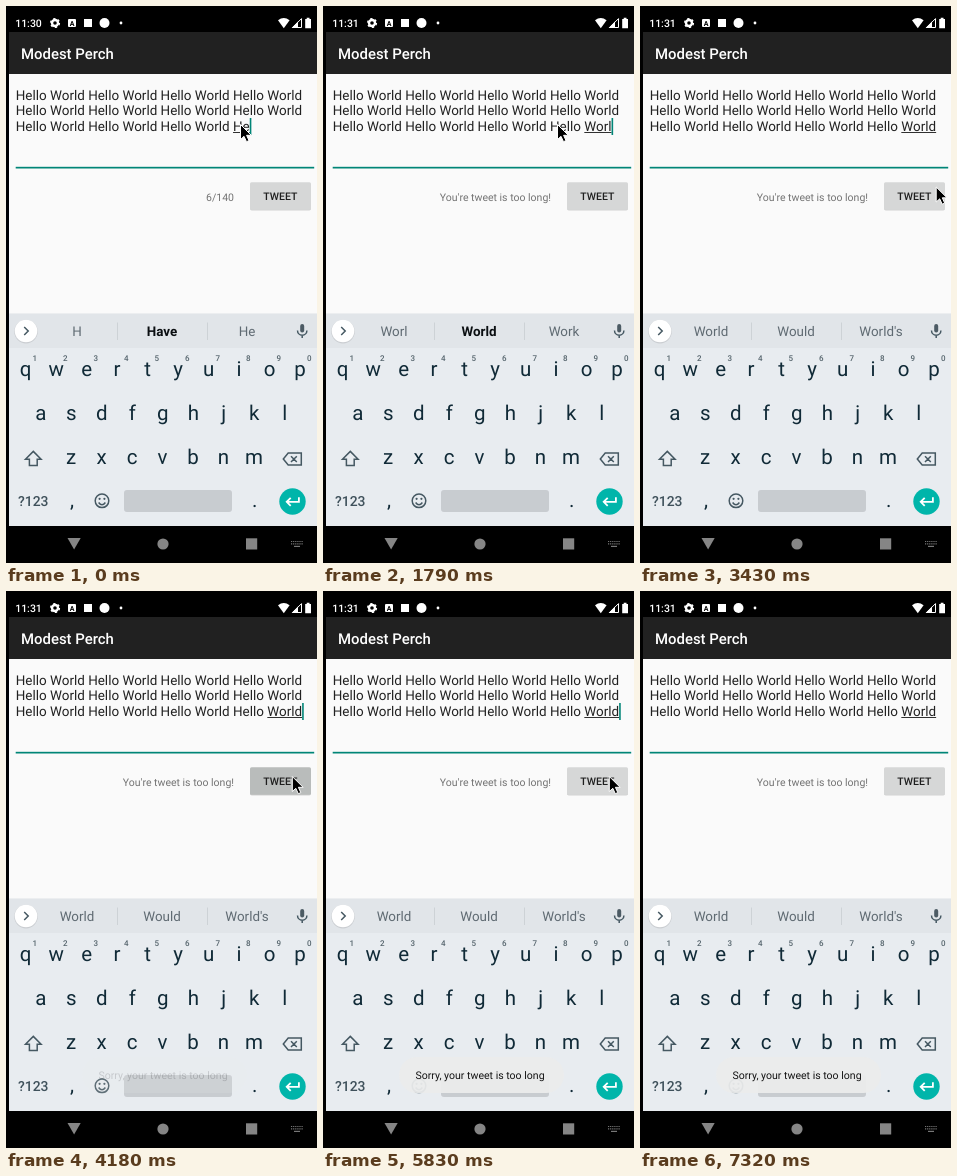
Animation, 311 px wide and 557 px high, one loop 7.72 s. Source, as an HTML page:

```html
<!DOCTYPE html>
<html lang="en">
<head>
<meta charset="utf-8">
<title>Message too long</title>
<style>
html, body { margin: 0; width: 100%; height: 100%; overflow: hidden; background: #000; }
svg { display: block; width: 311px; height: 557px; }
text { font-family: Roboto, "Noto Sans", sans-serif; white-space: pre; text-rendering: geometricPrecision; }
.mid { text-anchor: middle; }
.note { font-size: 13.46px; fill: #212121; }
.key { font-size: 20.5px; fill: #102a37; text-anchor: middle; }
.hint { font-size: 8px; font-weight: 500; fill: #56656d; text-anchor: middle; }
.word { font-size: 13.4px; fill: #5f6a72; text-anchor: middle; }
.word.best { font-weight: 700; fill: #0b0f12; }
.small { font-size: 10.5px; }
.strong { font-weight: 500; }
.line { fill: none; stroke: #455862; stroke-width: 1.5; }
</style>
</head>
<body>
<svg id="stage" viewBox="0 0 311 557">
  <rect width="311" height="557" fill="#000"/>
  <rect x="3" y="26" width="308" height="42" fill="#212121"/>
  <rect x="3" y="68" width="308" height="240" fill="#fafafa"/>
  <rect x="3" y="307" width="308" height="1.5" fill="#eceef0"/>
  <rect x="3" y="308" width="308" height="34" fill="#e1e5e9"/>
  <rect x="3" y="342" width="308" height="178" fill="#e8ecf0"/>

  <g fill="#fff">
    <text id="clock" class="small strong" x="9.2" y="20.6"></text>
    <circle cx="49" cy="17" r="3" fill="none" stroke="#fff" stroke-width="2.4"/>
    <circle cx="49" cy="17" r="4.4" fill="none" stroke="#fff" stroke-width="1.4" stroke-dasharray="2.2 2.408"/>
    <rect x="62" y="13" width="8" height="8" rx="1"/>
    <text class="mid" x="66" y="19.6" font-size="7" font-weight="700" style="fill:#000">A</text>
    <rect x="78" y="13" width="8" height="8"/>
    <circle cx="98.5" cy="17" r="5"/>
    <circle cx="115" cy="17" r="1.4"/>
    <path d="M277.8 22.3L272 14.2Q277.8 10 283.6 14.2Z"/>
    <path d="M286.6 21.5H295.5V12.6Z" fill="none" stroke="#fff"/>
    <path d="M285.6 22L292 15.6V22Z"/>
    <path d="M299.2 13H300.7V11.8H303.5V13H305V22.2H299.2Z"/>
    <text class="strong" x="15" y="52.8" font-size="14.9">Modest Perch</text>
  </g>

  <text class="note" x="9.7" y="93.6">Hello World Hello World Hello World Hello World</text>
  <text class="note" x="9.7" y="109.3">Hello World Hello World Hello World Hello World</text>
  <text class="note" id="typed" x="9.7" y="125"></text>
  <rect id="compose" y="126" height="1" fill="#303030"/>
  <rect id="caret" y="112" width="1.6" height="17" fill="#008577"/>
  <rect x="9.7" y="160.8" width="298.5" height="1.7" fill="#008577"/>
  <text id="count" class="small" x="228" y="194.7" text-anchor="end" fill="#737373"></text>
  <rect x="244" y="177.2" width="61" height="27.4" rx="1.8" fill="#000" opacity=".16"/>
  <rect id="button" x="244" y="176.3" width="61" height="27.5" rx="1.6"/>
  <text class="small strong mid" x="274.4" y="194" fill="#1e1e1e">TWEET</text>

  <circle cx="20" cy="325.6" r="11.8" fill="#000" opacity=".1"/>
  <circle cx="20" cy="325" r="11.3" fill="#fff"/>
  <path class="line" d="M18.2 321L22.2 325L18.2 329"/>
  <path d="M111.5 316.5V334M201.5 316.5V334" stroke="#cdd2d6"/>
  <text class="word" x="71" y="330"></text>
  <text class="word" x="156" y="330"></text>
  <text class="word" x="241" y="330"></text>
  <rect x="294.2" y="318" width="4" height="8.6" rx="2" fill="#4c5b64"/>
  <path class="line" d="M291.5 324.5A4.7 4.7 0 0 0 300.9 324.5M296.2 329V332"/>

  <g id="keys"></g>
  <path class="line" d="M27.3 445.4L35.1 453.3H31.2V459.4H23.4V453.3H19.5Z"/>
  <path class="line" d="M282.2 447H295.3V459H282.2L277.3 453Z M285 450.2L290.8 456M290.8 450.2L285 456"/>
  <text class="mid strong" x="27.2" y="499.9" font-size="13.9" fill="#3f515b">?123</text>
  <circle class="line" cx="96" cy="494.8" r="6.8"/>
  <g fill="#455862"><circle cx="93.6" cy="492.8" r="1.1"/><circle cx="98.4" cy="492.8" r="1.1"/></g>
  <path class="line" d="M92.6 496.5Q96 501 99.4 496.5"/>
  <rect x="118" y="484" width="108" height="22" rx="3" fill="#c8ccd0"/>
  <circle cx="286.5" cy="495.5" r="13.2" fill="#00b5aa"/>
  <path d="M292.9 491.2V495.8H280.8M284.7 491.8L280.7 495.8L284.7 499.8" fill="none" stroke="#fff" stroke-width="1.8"/>

  <g fill="#858585">
    <path d="M61.5 532H74.7L68.1 543.6Z"/>
    <circle cx="157" cy="538" r="5.6"/>
    <rect x="240" y="532.3" width="11.2" height="11.2"/>
    <path d="M285 535.5H297M285 537.8H297" stroke="#777" stroke-width="1.2" stroke-dasharray="1.2 .9"/>
    <path d="M288 540.4H294" stroke="#777" stroke-width="1.2"/>
  </g>

  <g id="toast">
    <rect x="76" y="466" width="165" height="36" rx="18" fill="#ebecec" opacity=".94"/>
    <text class="mid" x="157" y="488" font-size="10.55" fill="#141414">Sorry, your tweet is too long</text>
  </g>
  <path id="mouse" d="M0 0V15L3.5 11.8L6 17.2L8.5 16.1L6.1 10.8H10.8Z" fill="#000" stroke="#fff" stroke-width="1"/>
</svg>
<script>
const LOOP = 7720;
const LEFT = 9.7;
const $ = id => document.getElementById(id);
const words = document.querySelectorAll(".word");
const lead = "Hello World Hello World Hello World ";

// Each track is a list of [start time, value], held until the next entry.
const typing = [
  [0, ["He", "H", "*Have", "He"]],
  [140, ["Hel", "Hel", "*Help", "Hello"]],
  [290, ["Hell", "Hell", "*Hello", "Held"]],
  [590, ["Hello", "Hello", "Hellos", "Hell"]],
  [1040, ["Hello ", "to", "I", "you"]],
  [1340, ["Hello W", "W", "*We", "With"]],
  [1490, ["Hello Wo", "Wo", "*Would", "Work"]],
  [1640, ["Hello Wor", "Wor", "*Work", "Word"]],
  [1790, ["Hello Worl", "Worl", "*World", "Work"]],
  [2830, ["Hello World", "World", "Would", "World's"]]
];
const clock = [[0, "11:30"], [1490, "11:31"]];
const caret = [[0, 1], [2380, 0], [2830, 1], [3280, 0], [3730, 1], [4330, 0],
  [4780, 1], [5230, 0], [5830, 1], [6280, 0], [6720, 1], [7320, 0]];
const mouse = [[0, [234.5, 118.5]], [3130, [262, 143]], [3280, [291, 171]], [3430, [296.2, 181]],
  [3580, [290, 184]], [3730, [286.3, 185.5]], [6570, [288, 206]], [6720, [291, 258]],
  [6870, [295, 338]], [7020, [295.5, 432]], [7170, [295, 520]], [7320, [295, 600]]];
const press = [[0, "#d6d7d7"], [4030, "#c6c8c8"], [4180, "#b9bcbb"], [4330, "#c3c5c5"],
  [4480, "#cfd0d0"], [4630, "#d6d7d7"]];
const toast = [[0, 0], [4180, .16], [4330, .58], [4480, .88], [4630, 1]];

const at = (track, t) => track.filter(step => step[0] <= t).pop()[1];

function set(id, attrs) {
  for (const name in attrs) $(id).setAttribute(name, attrs[name]);
}

function label(node, text) {
  if (node.textContent !== text) node.textContent = text;
}

function buildKeys() {
  const parts = [];
  const add = (kind, text, x, y) => parts.push(`<text class="${kind}" x="${x}" y="${y}">${text}</text>`);
  const row = (letters, x, y) => [...letters].forEach((c, i) => add("key", c, x + 30.5 * i, y));
  row("qwertyuiop", 19.6, 370.3);
  row("asdfghjkl", 34.8, 414.3);
  row("zxcvbnm", 65, 458.3);
  [..."1234567890"].forEach((c, i) => add("hint", c, 28.8 + 30.5 * i, 354.8));
  add("key", ",", 66, 501.2);
  add("key", ".", 248.6, 501.2);
  $("keys").innerHTML = parts.join("");
}

function drawTyping(t) {
  const [tail, ...hints] = at(typing, t);
  const line = lead + tail;
  const typed = $("typed");
  label(typed, line);
  const width = n => n ? typed.getSubStringLength(0, n) : 0;
  const end = LEFT + width(line.length);
  const start = LEFT + width(line.lastIndexOf(" ") + 1);
  set("compose", { x: start, width: Math.max(0, end - start) });
  set("caret", { x: end, opacity: at(caret, t) });

  const left = 140 - 132 - tail.length;
  label($("count"), left < 0 ? "You're tweet is too long!" : left + "/140");
  hints.forEach((hint, i) => {
    label(words[i], hint.replace("*", ""));
    words[i].classList.toggle("best", hint[0] === "*");
  });
}

function draw(t) {
  drawTyping(t);
  label($("clock"), at(clock, t));
  set("mouse", { transform: `translate(${at(mouse, t)})` });
  set("button", { fill: at(press, t) });
  set("toast", { opacity: at(toast, t) });
}

const begin = performance.now();
function tick() {
  draw((performance.now() - begin) % LOOP);
  requestAnimationFrame(tick);
}
buildKeys();
tick();
</script>
</body>
</html>
```
